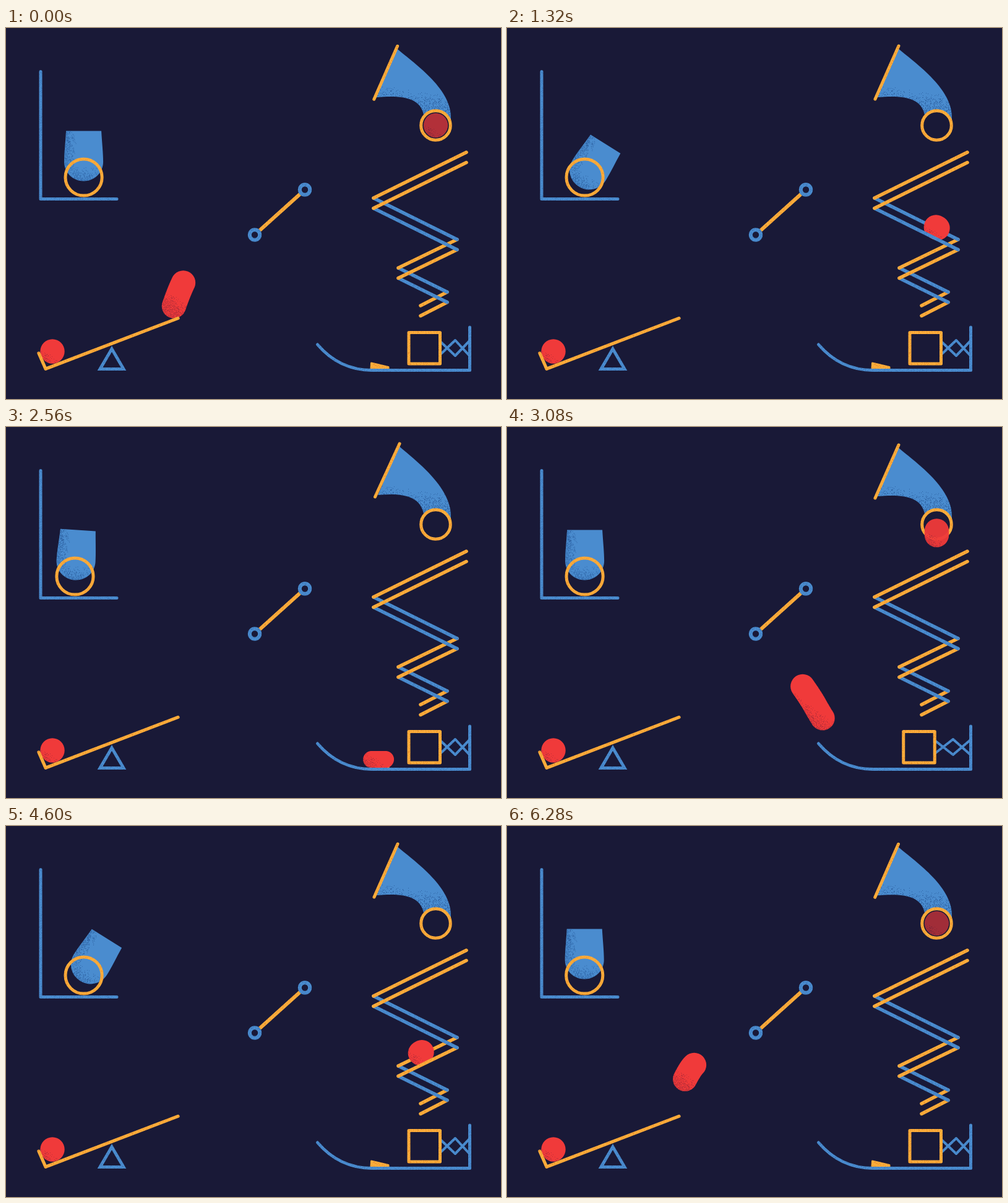
An HTML page with a canvas that plays this animation: 800x600 px, repeating every 6.32 s.

```html
<!DOCTYPE html>
<html lang="en">
<head>
<meta charset="utf-8">
<title>Chain reaction</title>
<style>
html, body { margin: 0; width: 100%; height: 100%; overflow: hidden; background: #191937; }
canvas { display: block; width: 800px; height: 600px; }
</style>
</head>
<body>
<canvas id="stage" width="800" height="600"></canvas>
<script>
const LOOP = 6320;
const HITS = [5, 3365]; // the moments a ball lands on the seesaw
const BG = '#191937', BLUE = '#4a8ccf', ORANGE = '#fbad3b', RED = '#f03a3a';
const RADIUS = 19.7;
const ctx = document.getElementById('stage').getContext('2d');

let seed = 7;
const rnd = () => (seed = (seed * 16807) % 2147483647) / 2147483647;
const clamp = v => Math.max(0, Math.min(1, v));
const mix = (a, b, u) => a + (b - a) * u;

// ---------- grain ----------
function newCanvas(w, h) {
  const c = document.createElement('canvas');
  c.width = w;
  c.height = h;
  return c;
}

function stipple(size, color, density) {
  const c = newCanvas(size, size), g = c.getContext('2d');
  g.fillStyle = color;
  for (let y = 0; y < size; y++)
    for (let x = 0; x < size; x++)
      if (rnd() < density(x, y)) g.fillRect(x, y, 1, 1);
  return c;
}

function grainy(base, speck) {
  const c = newCanvas(128, 128), g = c.getContext('2d');
  g.fillStyle = base;
  g.fillRect(0, 0, 128, 128);
  g.drawImage(stipple(128, speck, () => 0.2), 0, 0);
  return ctx.createPattern(c, 'repeat');
}

const blueInk = grainy(BLUE, '#3f79ba');
const orangeInk = grainy(ORANGE, '#ec952f');
const ballShade = stipple(140, '#c02f38', (x, y) =>
  0.5 * clamp(((70 - x) * 0.6 + (y - 70) * 0.8 - 3) / 24));
const cupShade = stipple(160, '#2f65a6', (x, y) =>
  0.5 * Math.max(clamp((68 - x) / 24), clamp((y - 62) / 28)));
const hornShade = stipple(140, '#2f65a6', (x, y) =>
  0.5 * clamp((y - 64 - x * 0.14) / 44));

// ---------- motion ----------
// Smooth step from 0 to 1 between two times
function ramp(t, from, to) {
  const u = clamp((t - from) / (to - from));
  return u * u * (3 - 2 * u);
}

// Rise during a..b, fall back during c..d
const pulse = (t, a, b, c, d) => ramp(t, a, b) * (1 - ramp(t, c, d));

const spring = (age, size, decay, beat) =>
  age > 0 ? size * Math.exp(-age / decay) * Math.sin(age / beat) : 0;

// Stops are [time, x, y, lift]; lift arches the way to that stop like a throw
function locate(path, t) {
  const i = path.findIndex(stop => t < stop[0]);
  if (i < 1) return null;
  const [t0, x0, y0] = path[i - 1], [t1, x1, y1, lift = 0] = path[i];
  const u = (t - t0) / (t1 - t0);
  return [mix(x0, x1, u), mix(y0, y1, u) - 4 * lift * u * (1 - u)];
}

const CORNERS = [[744, 201], [594, 275], [729, 342], [634, 388], [713, 427], [670, 449]];
const RAIL_GAP = 16.5;

// Rolling stops: the inner side of each corner, reached at constant speed
function rollDown(t, speed) {
  const stops = [];
  CORNERS.slice(1).forEach(([x, y], i) => {
    const next = [x + (i % 2 ? -10 : 10), y - 5];
    const last = stops[stops.length - 1];
    if (last) t += Math.hypot(next[0] - last[1], next[1] - last[2]) / speed;
    stops.push([t, ...next]);
  });
  return stops;
}

const TO_CANNON = [[15, 75, 523], [585, 424, 277, 104], [1250, 138, 218, 124]];
const TO_HORN = [[2110, 170, 190], [2500, 640, 75, 90]];
const TO_SEESAW = [
  [2600, 694.5, 157.5], [3005, 694.5, 157.5], [3155, 694.5, 219, 15.5],
  ...rollDown(3880, 0.265),
  [5480, 602, 531, 26], [5890, 603, 532],
  [6035, 496, 447, -28], [6262, 300, 389, 66], [6335, 271, 451, 6]
];
const SETTLE = [[0, 272, 447], [130, 262, 500], [515, 97, 482, 12], [690, 75, 523, 4], [LOOP, 75, 523]];

// ---------- drawing helpers ----------
function line(ink, width, ...p) {
  ctx.beginPath();
  for (let i = 0; i < p.length; i += 2) ctx.lineTo(p[i], p[i + 1]);
  ctx.strokeStyle = ink;
  ctx.lineWidth = width;
  ctx.stroke();
}

function ring(ink, x, y, r, width, fill) {
  ctx.beginPath();
  ctx.arc(x, y, r, 0, 7);
  if (fill) {
    ctx.fillStyle = fill;
    ctx.fill();
  }
  ctx.strokeStyle = ink;
  ctx.lineWidth = width;
  ctx.stroke();
}

const buffer = newCanvas(140, 140);
const bctx = buffer.getContext('2d');

// A ball smeared along its own path, longer the faster it goes
function ball(path, t, squash = 0, alpha = 1) {
  const at = locate(path, t);
  if (!at) return;
  const from = locate(path, t - 4) || at, to = locate(path, t + 4) || at;
  const speed = Math.hypot(to[0] - from[0], to[1] - from[1]) / 8;
  const reach = 20 * clamp(speed / 0.9);
  const left = Math.round(at[0]) - 70, top = Math.round(at[1]) - 70;

  bctx.globalCompositeOperation = 'source-over';
  bctx.clearRect(0, 0, 140, 140);
  bctx.fillStyle = RED;
  bctx.beginPath();
  for (let k = -1; k <= 1.001; k += 0.05) {
    const p = locate(path, t + k * reach);
    if (!p) continue;
    const x = p[0] - left + 11.5 * squash * k, y = p[1] - top + 6.5 * squash;
    const r = RADIUS - 6.2 * squash;
    bctx.moveTo(x + r, y);
    bctx.arc(x, y, r, 0, 2 * Math.PI);
  }
  bctx.fill();
  bctx.globalCompositeOperation = 'source-atop';
  bctx.drawImage(ballShade, 0, 0);
  ctx.globalAlpha = alpha;
  ctx.drawImage(buffer, left, top);
  ctx.globalAlpha = 1;
}

// ---------- machine parts ----------
function cannon(q) {
  const recoil = -24 * pulse(q, 2090, 2230, 2230, 2970);
  const turn = 32 * pulse(q, 800, 1180, 2085, 2150) + 45 * pulse(q, 1400, 1900, 2260, 2620);
  const push = 12 * pulse(q, 1215, 1265, 1265, 1700);
  const s = pulse(q, 1750, 2075, 2085, 2160);
  const m = mix(28.5, 22, s), w = mix(31.5, 42, s);
  const mouth = mix(-75, -50, s), mid = mix(-25, -20, s), base = 6 + s;
  const low = mix(mid, base, 0.56), soft = 18 * (1 - s);

  ctx.save();
  ctx.translate(125.6 + recoil, 241.5);
  ctx.save();
  ctx.rotate(turn * Math.PI / 180);
  ctx.translate(-14 * s, push);
  ctx.beginPath();
  ctx.moveTo(m, mouth);
  ctx.lineTo(-m, mouth);
  ctx.bezierCurveTo(-m - 1 - 12 * s, mouth + soft, -w, mid - 14, -w, mid);
  ctx.bezierCurveTo(-w, low, -w * 0.56, base, 0, base);
  ctx.bezierCurveTo(w * 0.56, base, w, low, w, mid);
  ctx.bezierCurveTo(w, mid - 14, m + 1 + 12 * s, mouth + soft, m, mouth);
  ctx.fillStyle = BLUE;
  ctx.fill();
  ctx.clip();
  ctx.drawImage(cupShade, -80, -80);
  ctx.restore();
  ring(orangeInk, 0, 0, 29.6, 5);
  ctx.restore();
}

function horn(q) {
  const k = spring(q - 2490, 2.4, 160, 95);
  const x = 3 * k, y = -2 * k;
  ctx.save();
  ctx.beginPath();
  ctx.moveTo(632 + x, 33 + y);
  ctx.bezierCurveTo(664 + x, 60 + y, 722, 100, 719, 148);
  ctx.lineTo(694, 157);
  ctx.lineTo(675.5, 142);
  ctx.bezierCurveTo(670, 110, 636 + x, 109 + y, 598 + x, 112 + y);
  ctx.fillStyle = BLUE;
  ctx.fill();
  ctx.clip();
  ctx.drawImage(hornShade, 595, 26);
  ctx.restore();
  line(orangeInk, 5, 633 + x, 29 + y, 595 + x / 2, 115 + y);
  ring(orangeInk, 694.5, 157.5, 23.8, 5, BG);
}

function rails(drop) {
  for (let i = CORNERS.length - 1; i > 0; i--) {
    const [x0, y0] = CORNERS[i - 1], [x1, y1] = CORNERS[i];
    line(i % 2 ? orangeInk : blueInk, 5.5, x0, y0 + drop, x1, y1 + drop);
  }
}

function seesaw(age) {
  ctx.lineJoin = 'miter';
  ctx.beginPath();
  ctx.moveTo(171, 519);
  ctx.lineTo(190, 551.5);
  ctx.lineTo(152, 551.5);
  ctx.closePath();
  ctx.strokeStyle = blueInk;
  ctx.lineWidth = 5;
  ctx.stroke();
  ctx.lineJoin = 'round';
  ctx.save();
  ctx.translate(170, 511);
  ctx.rotate(0.5 * pulse(age, 0, 120, 210, 710));
  line(orangeInk, 5.2, -117, 15, -106, 40.3, 108, -41.6);
  ctx.restore();
}

function bumper(q) {
  const k = spring(q - 585, 6, 90, 35);
  ctx.save();
  ctx.translate(0.67 * k, 0.74 * k);
  line(orangeInk, 5.8, 402, 334.5, 483, 261.5);
  ring(blueInk, 402, 334.5, 8.2, 6, BG);
  ring(blueInk, 483, 261.5, 8.2, 6, BG);
  ctx.restore();
}

function wedge(q) {
  const rise = 1 - pulse(q, 5870, 5900, 6140, 6220);
  if (rise < 0.02) return;
  ctx.save();
  ctx.translate(0, 552);
  ctx.scale(1, rise);
  ctx.beginPath();
  ctx.moveTo(590.5, -10);
  ctx.lineTo(618, -3.5);
  ctx.lineTo(618, -1);
  ctx.lineTo(590, -1);
  ctx.closePath();
  ctx.fillStyle = ctx.strokeStyle = orangeInk;
  ctx.lineWidth = 3;
  ctx.fill();
  ctx.stroke();
  ctx.restore();
}

function slide() {
  ctx.beginPath();
  ctx.moveTo(503.5, 512);
  ctx.bezierCurveTo(524, 536, 552, 553.5, 592, 553.5);
  ctx.lineTo(749.5, 553.5);
  ctx.lineTo(749.5, 484);
  ctx.strokeStyle = blueInk;
  ctx.lineWidth = 5;
  ctx.stroke();
}

function piston(q) {
  const dx = -36 * pulse(q, 5780, 5880, 5900, 6110);
  const x0 = 703 + dx, mid = (x0 + 749) / 2;
  line(blueInk, 4, x0, 508, mid, 530, 749, 506);
  line(blueInk, 4, x0, 527, mid, 505, 749, 530);
  ctx.strokeStyle = orangeInk;
  ctx.lineWidth = 5;
  ctx.strokeRect(651 + dx, 492.5, 50.5, 50.5);
}

// ---------- scene ----------
function draw(now) {
  const t = now % LOOP;
  const phases = HITS.map(hit => (t - hit + LOOP) % LOOP);
  const newest = Math.min(...phases), oldest = Math.max(...phases);
  // One trip at a time uses the upper machines, from bumper to horn
  const upper = phases.find(q => q > 500 && q < 3460) ?? 0;

  ctx.fillStyle = BG;
  ctx.fillRect(0, 0, 800, 600);
  ctx.lineCap = ctx.lineJoin = 'round';

  line(blueInk, 5, 56, 70.5, 56, 276.5, 179, 276.5);
  for (const q of phases) {
    ball(TO_CANNON, q);
    ball(TO_HORN, q);
  }
  cannon(upper);
  horn(upper);
  rails(0);
  wedge(oldest);
  for (const q of phases)
    ball(TO_SEESAW, q, pulse(q, 5480, 5512, 5522, 5590), clamp((q - 2600) / 500));
  rails(RAIL_GAP);
  slide();
  piston(oldest);
  bumper(upper);
  ball(SETTLE, newest);
  seesaw(newest);
}

function tick() {
  draw(performance.now());
  requestAnimationFrame(tick);
}
tick();
</script>
</body>
</html>
```
